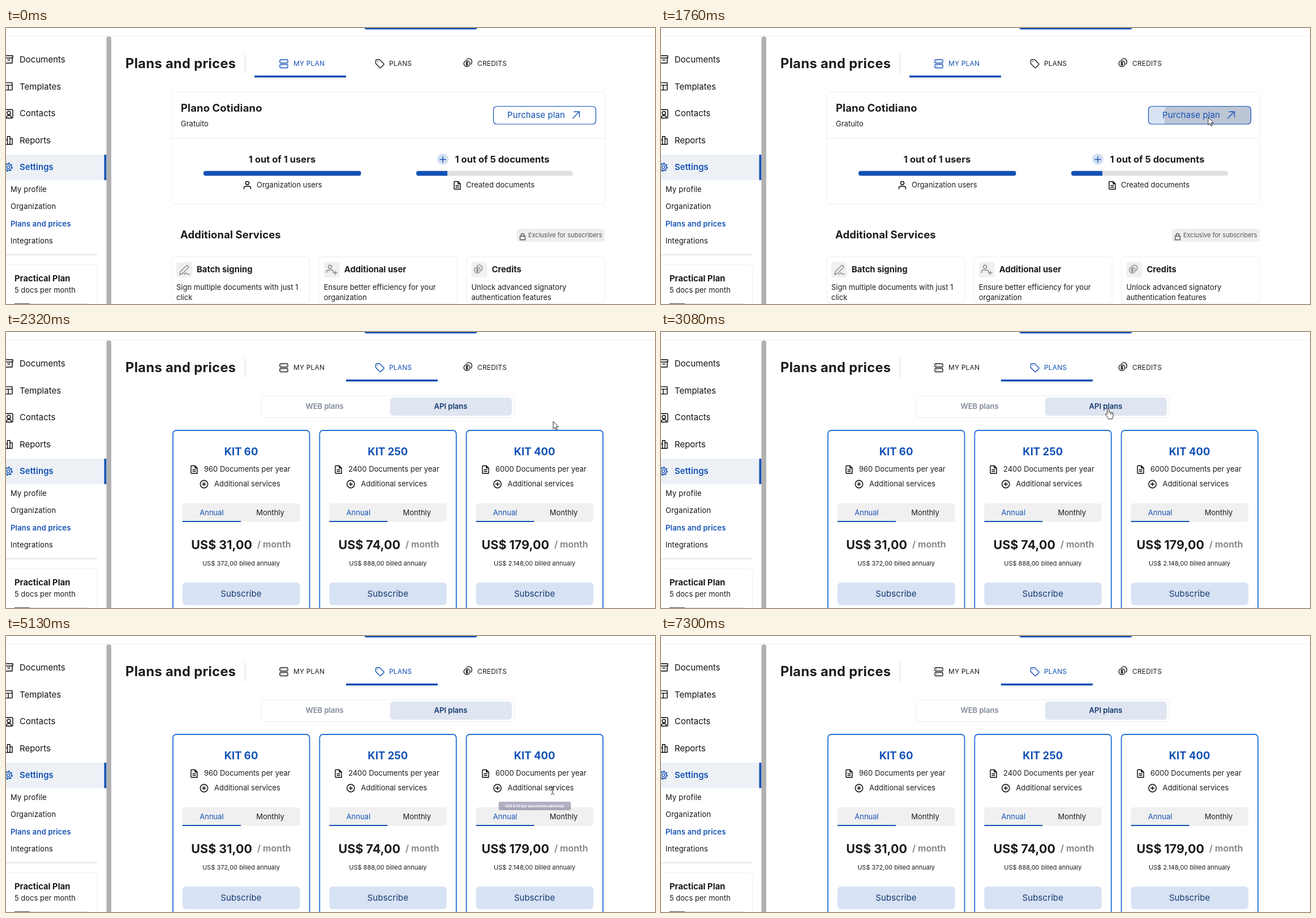
Write an HTML page that moves like this. It is 1147 px wide and 488 px high and loops after 8.38 s.

```html
<!DOCTYPE html>
<html lang="en">
<head>
<meta charset="utf-8">
<title>Plans and prices</title>
<style>
  html, body { margin: 0; width: 100%; height: 100%; overflow: hidden; background: #fff; }
  svg { display: block; width: 1147px; height: 488px; font-family: Inter, "Open Sans", sans-serif; font-size: 13px; fill: #1c1c1c; }
  .nav { font-size: 15px; fill: #111; }
  .sub { letter-spacing: .2px; fill: #111; }
  .tab { font-size: 12px; letter-spacing: .15px; fill: currentColor; }
  .h1 { font-size: 23.7px; font-weight: 700; letter-spacing: .3px; }
  .h2 { font-size: 18.5px; font-weight: 700; letter-spacing: .1px; }
  .h3 { font-size: 14.8px; font-weight: 700; }
  .count { font-size: 16.5px; font-weight: 700; }
  .button { font-size: 15px; letter-spacing: .1px; }
  .small { font-size: 11px; }
  .name { font-size: 18.5px; font-weight: 700; }
  .price { font-size: 21.5px; font-weight: 700; }
  .month { font-size: 16px; font-weight: 600; fill: #808080; }
  .bold { font-weight: 600; }
  .mid { text-anchor: middle; }
  .end { text-anchor: end; }
  .blue { fill: #1351b4; color: #1351b4; }
  .dark { color: #1c1c1c; }
  .navy { fill: #14386f; }
  .grey { color: #858585; }
  .box { fill: #fff; stroke: #ededed; }
  .pale { fill: #f0f0f0; }
  .icon { fill: none; stroke: currentColor; stroke-width: 1.4; stroke-linecap: round; stroke-linejoin: round; }
  .cursor { fill: #fff; stroke: #222; stroke-linejoin: round; }
</style>
</head>
<body>
<svg viewBox="0 0 1147 488">
  <defs>
    <symbol id="archive" overflow="visible"><path d="M0 0h14v4H0zM1 4v9h12V4M5 7.5h4"/></symbol>
    <symbol id="layout" overflow="visible"><path d="M1 0h12v13H1zM1 4.500h12M6 4.500V13"/></symbol>
    <symbol id="contact" overflow="visible"><rect width="14" height="15" rx="1.5"/><circle cx="7" cy="6" r="3"/><path d="M2.5 14c1-5 8-5 9 0"/></symbol>
    <symbol id="bars" overflow="visible"><path d="M0 6h4.5v8H0zM4.5 0H9v14H4.5zM9 4h4v10H9z"/></symbol>
    <symbol id="gear" overflow="visible"><circle r="2.6"/><circle r="5.8"/><circle r="7" stroke-width="2" stroke-linecap="butt" stroke-dasharray="2.5 3"/></symbol>
    <symbol id="server" overflow="visible"><rect width="14" height="6" rx="1.5"/><rect y="8.5" width="14" height="6" rx="1.5"/><path d="M3 3h.2M3 11.5h.2"/></symbol>
    <symbol id="tag" overflow="visible"><path d="M0 1.5Q0 0 1.5 0H7l7 7q1 1 0 2l-5 5q-1 1-2 0L0 7zM3.3 3.3h.3"/></symbol>
    <symbol id="coins" overflow="visible"><circle cx="5.5" cy="9" r="5.3"/><path d="M5 1.5a5.2 5.2 0 1 1 7.5 8.5M7.2 7.2C6 6 3.7 6.5 4 7.8s3.2.8 3.2 2.3-2.5 1.6-3.4.4M5.6 5.6v6.8"/></symbol>
    <symbol id="person" overflow="visible"><circle cx="6" cy="3.2" r="3"/><path d="M0 13.5V12q0-3 3-3h6q3 0 3 3v1.5"/></symbol>
    <symbol id="file" overflow="visible"><path d="M1 0h6l4 4v9.5H1q-1 0-1-1V1q0-1 1-1zM7 0v4h4M3 7h5M3 10h5"/></symbol>
    <symbol id="plus" overflow="visible"><circle r="6.7"/><path d="M-3 0h6M0-3v6"/></symbol>
    <symbol id="pen" overflow="visible"><path d="M1 17l1-5L13 1q1.500-1 3 .500t.500 3L6 15zM9 17q2-4 4-2t5 1"/></symbol>
    <clipPath id="purchaseClip"><rect x="861" y="138" width="181.5" height="32" rx="6"/></clipPath>
  </defs>

  <rect width="1147" height="488" fill="#fff"/>
  <path d="M0 14.5h1147" stroke="#eee"/>
  <path class="blue" d="M633-5h200v3.500q0 4-5 4H638q-5 0-5-4z"/>

  <g id="sidebar">
    <path d="M0 224h177v45H0z" fill="#edf1f6"/>
    <path class="blue" d="M173.500 224h4v45h-4z"/>
    <path d="M177.500 488V19q0-4 4.250-4t4.250 4v469z" fill="#b0b0b0"/>
    <path d="M0 401h161" stroke="#ddd" stroke-width="1.5"/>
    <rect class="box" x="-20" y="417.5" width="181.5" height="90" rx="7"/>
    <text class="h3" x="15" y="448">Practical Plan</text>
    <text x="15" y="468">5 docs per month</text>
    <path d="M15 487h131v1H15z" fill="#ddd"/><path d="M15 487h27v1H15z" fill="#444"/>
  </g>

  <text class="h1" x="211" y="71">Plans and prices</text>
  <path d="M422.5 46v34" stroke="#d8d8d8"/>
  <g id="myTab"><use class="icon" href="#server" x="484" y="56"/><text class="tab" x="508" y="67">MY PLAN</text></g>
  <g id="plansTab"><use class="icon" href="#tag" x="653.5" y="56"/><text class="tab" x="677" y="67">PLANS</text></g>
  <g class="dark"><use class="icon" href="#coins" x="809" y="54"/><text class="tab" x="833" y="67">CREDITS</text></g>
  <rect id="indicator" class="blue" x="439" y="84" width="162" height="3.500"/>

  <g id="overview">
    <rect class="box" x="292.5" y="112.5" width="766" height="199" rx="6"/>
    <path d="M293 195h765" stroke="#e8e8e8"/>
    <text class="h2" x="309" y="148">Plano Cotidiano</text>
    <text x="309" y="174">Gratuito</text>
    <rect id="purchase" x="861.5" y="138.5" width="181" height="31.5" rx="6" fill="#fff"/>
    <g clip-path="url(#purchaseClip)"><circle id="ripple" cx="968" cy="158" fill="#000" opacity=".13"/></g>
    <rect x="861.5" y="138.5" width="181" height="31.5" rx="6" fill="none" stroke="#1351b4" stroke-width="1.2"/>
    <text class="button blue" x="886" y="159">Purchase plan</text>
    <path class="icon blue" d="M1002 159.5l11-11.5M1004 148h9.5v9.5"/>

    <text class="count mid" x="488" y="238">1 out of 1 users</text>
    <rect class="blue" x="349" y="252.800" width="278.5" height="8.400" rx="4"/>
    <use class="icon" href="#person" x="420.5" y="271"/>
    <text x="443" y="282">Organization users</text>
    <circle cx="772" cy="232" r="10" fill="#d3dff2"/>
    <path class="icon blue" d="M767 232.5h10M772 227.5v10"/>
    <text class="count mid" x="877" y="238">1 out of 5 documents</text>
    <rect x="725" y="252.800" width="277" height="8.400" rx="4" fill="#dfdfdf"/>
    <path class="blue" d="M780 252.800h-51q-4 0-4 4.200t4 4.200h51z"/>
    <use class="icon" href="#file" x="792" y="271.5"/>
    <text x="813" y="282">Created documents</text>

    <text class="h2" x="308" y="372">Additional Services</text>
    <rect x="903" y="355" width="155" height="23" rx="3" fill="#eee"/>
    <path class="icon" style="color:#555" d="M908.5 368h9v6.5h-9zM910.5 368v-2q0-2.5 2.5-2.5t2.5 2.5v2"/>
    <text class="small" x="923" y="370" fill="#555">Exclusive for subscribers</text>
    <g id="services"></g>
  </g>

  <g id="plans">
    <rect class="box" x="450.5" y="112.5" width="448" height="39" rx="6"/>
    <rect x="679" y="116" width="215" height="32" rx="6" fill="#dfe5f1"/>
    <text class="bold mid" x="563" y="136" fill="#7f8896">WEB plans</text>
    <text class="bold mid navy" x="786" y="136">API plans</text>
    <g id="cards"></g>
  </g>

  <g id="tooltip">
    <rect x="-123.5" y="-14.5" width="247" height="29" rx="6" fill="#524a75"/>
    <text class="mid" y="4" fill="#fff" font-size="11.8" font-weight="700">US$ 0.54 por documento adicional;</text>
  </g>
  <circle id="press" cx="775.5" cy="129.5" r="12" fill="#1351b4" opacity=".12"/>

  <g id="pointer" class="cursor">
    <path id="arrow" d="M0 0v13.5l3.2-3 2.2 5 2-.9-2.2-4.8h4.4z"/>
    <path id="hand" d="M-1.5 9V1a1.5 1.5 0 0 1 3 0v5.5c0-1.2 2.5-1.2 2.7.3.3-1 2.5-.8 2.6.5.5-.8 2.2-.5 2.2.8V12c0 2-1.5 3-1.5 6H.5C0 15-4.500 12-4.500 10c0-1.500 2-1.500 3-.2zM4.2 7v3M6.8 7.5V10"/>
    <path id="beam" fill="none" d="M-3-6.5h2l1 1 1-1h2M-3 6.5h2l1-1 1 1h2M0-5.5v11"/>
  </g>
</svg>
<script>
  const $ = id => document.getElementById(id);
  const text = (x, y, content, cls = '') => `<text x="${x}" y="${y}" class="${cls}">${content}</text>`;
  const icon = (name, x, y, cls = '') => `<use href="#${name}" x="${x}" y="${y}" class="icon ${cls}"/>`;
  const box = (x, y, w, h, r, attrs) => `<rect x="${x}" y="${y}" width="${w}" height="${h}" rx="${r}" ${attrs}/>`;

  const menu = [['Documents', 'archive'], ['Templates', 'layout'], ['Contacts', 'contact'], ['Reports', 'bars']];
  $('sidebar').innerHTML += menu.map(([label, shape], i) =>
    icon(shape, -2, 49 + i * 47.6) + text(24, 61 + i * 47.6, label, 'nav')).join('') +
    icon('gear', 4, 246, 'blue') + text(24, 251, 'Settings', 'nav bold blue') +
    ['My profile', 'Organization', 'Plans and prices', 'Integrations'].map((label, i) =>
      text(8, 290 + i * 30.3, label, i === 2 ? 'sub bold blue' : 'sub')).join('');

  const services = [
    ['Batch signing', 'Sign multiple documents with just 1', 'click', 'pen'],
    ['Additional user', 'Ensure better efficiency for your', 'organization', 'person'],
    ['Credits', 'Unlock advanced signatory', 'authentication features', 'coins']];
  $('services').innerHTML = services.map(([title, line1, line2, shape], i) => {
    const x = 292 + i * 260.7;
    const extra = i === 1 ? '<path class="icon grey" d="M579 433h6M582 430v6"/>' : '';
    return box(x + .5, 404.5, 244, 82.5, 6, 'class="box"') + box(x + 9, 414, 28, 27, 4, 'class="pale"') +
      icon(shape, x + 14, 419, 'grey') + extra +
      text(x + 45, 432, title, 'h3') + text(x + 9, 463, line1) + text(x + 9, 481, line2);
  }).join('');

  const offers = [
    ['KIT 60', 960, '31,00', '372,00', 350, 444],
    ['KIT 250', 2400, '74,00', '888,00', 605, 706],
    ['KIT 400', 6000, '179,00', '2.148,00', 865, 969]];
  $('cards').innerHTML = offers.map(([name, docs, price, billed, docsX, monthX], i) => {
    const x = 295 + i * 259.3, mid = x + 120.5;
    return box(x, 174, 241.5, 340, 6, 'fill="#fff" stroke="#1f6fd6" stroke-width="1.8"') +
      text(mid, 218, name, 'name mid blue') +
      icon('file', docsX - 23, 236.5) + text(docsX, 247, docs + ' Documents per year') +
      icon('plus', x + 55, 269) + text(x + 73, 273, 'Additional services') +
      box(x + 17, 303, 207.5, 32, 3, 'class="pale"') + box(x + 17, 334, 103, 2, 0, 'class="blue"') +
      text(x + 68.5, 324, 'Annual', 'mid blue') + text(x + 172, 324, 'Monthly', 'mid') +
      text(monthX - 9, 384, 'US$ ' + price, 'price end') + text(monthX, 381, '/ month', 'month') +
      text(mid, 413, `US$ ${billed} billed annualy`, 'small mid') +
      box(x + 17, 443, 207.5, 40, 6, `fill="#d7e2f4" id="subscribe${i}"`) +
      text(mid, 468, 'Subscribe', 'button mid navy');
  }).join('');

  // Pointer moves: start, end, number of steps, target x, target y, eased
  const moves = [
    [390, 1220, 13, 967, 158, true],
    [2450, 3220, 12, 776, 134, true],
    [4150, 4920, 12, 958, 247, true],
    [4990, 5130, 3, 966, 273, false],
    [5200, 5820, 10, 952, 390, true],
    [5890, 6090, 4, 945, 449, false],
    [6160, 6430, 5, 948, 468, true],
    [7090, 7300, 4, 988, 492, false]];
  const LOOP = 8380, SWAP = 1890;
  const clamp = v => Math.max(0, Math.min(1, v));
  const smooth = p => p * p * (3 - 2 * p);
  const show = (id, on) => $(id).style.display = on ? '' : 'none';

  function pointerAt(t) {
    let x = 1114, y = 494;
    for (const [start, end, steps, toX, toY, eased] of moves) {
      if (t < start) break;
      const done = Math.floor((t - start) / (end - start) * (steps - 1) + 1e-6) + 1;
      const p = clamp(done / steps), k = eased ? smooth(p) : p;
      x += (toX - x) * k;
      y += (toY - y) * k;
    }
    return [x, y];
  }

  function render(t) {
    const [x, y] = pointerAt(t);
    const inside = (l, top, r, b) => x >= l && x <= r && y >= top && y <= b;
    const swapped = t >= SWAP;
    show('overview', !swapped);
    show('plans', swapped);
    $('plans').setAttribute('opacity', clamp((t - SWAP + 70) / 280));
    $('myTab').setAttribute('class', swapped ? 'dark' : 'blue');
    $('plansTab').setAttribute('class', swapped ? 'blue' : 'dark');
    $('indicator').setAttribute('x', 439 + 162 * smooth(clamp((t - SWAP) / 300)));

    $('purchase').setAttribute('fill', inside(861, 138, 1042, 170) ? '#d9e3f5' : '#fff');
    $('ripple').setAttribute('r', t < 1550 ? 0 : 30 + (t - 1550) * .23);

    const overSubscribe = swapped && inside(830, 443, 1038, 483);
    $('subscribe2').setAttribute('fill', overSubscribe ? '#abc8f7' : '#d7e2f4');

    const grow = clamp((t - 5055) / 145), fade = clamp((5560 - t) / 120);
    show('tooltip', grow > 0 && fade > 0);
    $('tooltip').setAttribute('transform', `translate(934.5 300.5) scale(${grow})`);
    $('tooltip').setAttribute('opacity', .85 * grow * fade);
    show('press', t >= 3420 && t < 3620);

    const beam = t >= 4780 && t < 5890;
    const hand = !beam && swapped && (overSubscribe || inside(679, 116, 894, 148));
    show('pointer', t >= 390 && t < 7300);
    show('beam', beam);
    show('hand', hand);
    show('arrow', !beam && !hand);
    $('pointer').setAttribute('transform', `translate(${x} ${y})`);
  }

  let origin;
  function tick(now) {
    origin ??= now;
    render((now - origin) % LOOP);
    requestAnimationFrame(tick);
  }
  render(0);
  requestAnimationFrame(tick);
</script>
</body>
</html>
```
